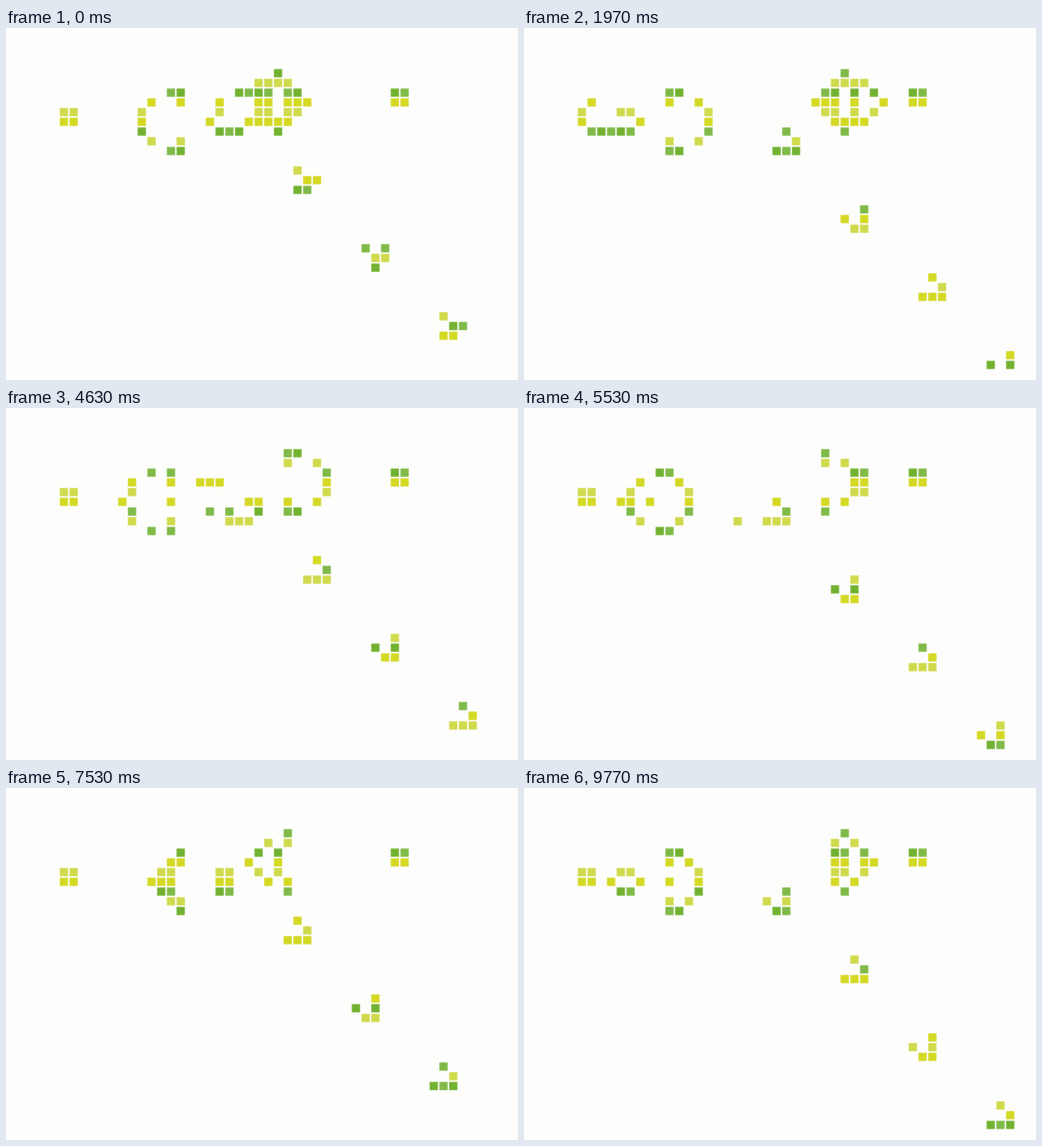
Recreate the animation shown at these times as a matplotlib script. Size 526 by 362 pixels, loop 9810 ms.

```python
import numpy as np
import matplotlib.pyplot as plt
from matplotlib.animation import FuncAnimation
from matplotlib.collections import PolyCollection

W, H, DPI = 526, 362, 64
LOOP, STEP = 9810, 30            # ms
GEN_MS, LEAD = 132.7, 49         # time per generation, head start
GENERATIONS = 74
WARMUP = 4 + 5 * 30              # fills the stream of gliders
PITCH, SIDE, SOFT = 10, 9, 0.3   # SOFT insets the edge for a lighter rim
LEFT, TOP = 55, 42               # pixel corner of cell (0, 0)
ROWS, COLS = 31, 47              # visible part of the world
PAD, WORLD = 6, 120

BACKGROUND = "#fdfdfc"
YELLOW, PALE = "#d4d924", "#d0da4c"
GREENS = ["#72b230", "#80ba48"]  # even and odd columns
BANDS = [None, PALE, None, YELLOW, PALE, YELLOW]

# Columns of the live cells in each row of the glider gun
GUN = [
    [24],
    [22, 24],
    [12, 13, 20, 21, 34, 35],
    [11, 15, 20, 21, 34, 35],
    [0, 1, 10, 16, 20, 21],
    [0, 1, 10, 14, 16, 17, 22, 24],
    [10, 16, 24],
    [11, 15],
    [12, 13],
]


def evolve(world):
    """One generation of Conway's Game of Life."""
    near = sum(
        np.roll(world, (dr, dc), (0, 1))
        for dr in (-1, 0, 1)
        for dc in (-1, 0, 1)
        if dr or dc
    )
    return ((near == 3) | ((near == 2) & (world == 1))).astype(int)


def square(row, col):
    x, y = LEFT + PITCH * col + SOFT, TOP + PITCH * row + SOFT
    side = SIDE - 2 * SOFT
    return [(x, y), (x + side, y), (x + side, y + side), (x, y + side)]


def colour(row, col):
    return BANDS[row % len(BANDS)] or GREENS[col % 2]


def history():
    world = np.zeros((WORLD, WORLD), int)
    for row, cols in enumerate(GUN):
        world[row + PAD, np.array(cols) + PAD] = 1
    for _ in range(WARMUP):
        world = evolve(world)
    poses = []
    for _ in range(GENERATIONS):
        view = world[PAD:PAD + ROWS, PAD - 1:PAD + COLS]
        live = [(int(r), int(c) - 1) for r, c in np.argwhere(view)]
        poses.append((
            [square(r, c) for r, c in live],
            [colour(r, c) for r, c in live],
        ))
        world = evolve(world)
    return poses


POSES = history()

fig = plt.figure(figsize=(W / DPI, H / DPI), dpi=DPI, facecolor=BACKGROUND)
ax = fig.add_axes([0, 0, 1, 1])
ax.set_xlim(0, W)
ax.set_ylim(H, 0)
ax.axis("off")

cells = PolyCollection([], linewidths=0, antialiaseds=True, snap=False)
ax.add_collection(cells, autolim=False)


def draw(i):
    gen = min(int((i * STEP + LEAD) / GEN_MS), GENERATIONS - 1)
    verts, colours = POSES[gen]
    cells.set_verts(verts)
    cells.set_facecolor(colours)
    return [cells]


anim = FuncAnimation(fig, draw, frames=LOOP // STEP, interval=STEP,
                     repeat=True, repeat_delay=0, blit=False)
plt.show()
```
